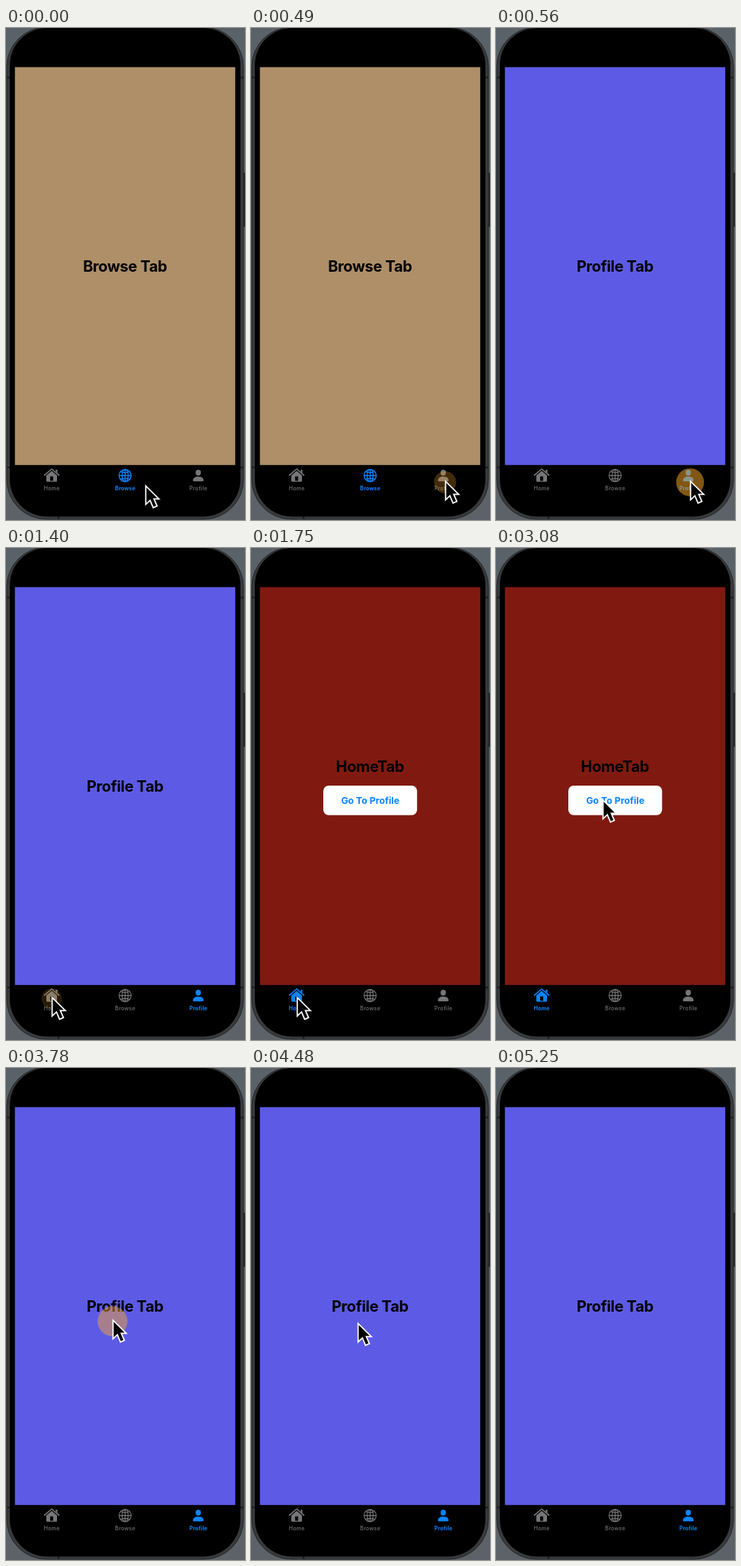
Recreate the animation shown at these times as an HTML page. Size 314 by 646 pixels, loop 5.46 s.

```html
<!DOCTYPE html>
<html lang="en">
<head>
<meta charset="utf-8">
<title>Tab bar</title>
<style>
  html, body { margin: 0; width: 100%; height: 100%; overflow: hidden; background: #000; }
  svg { display: block; width: 100%; height: 100%; }
  text { font-family: Inter, sans-serif; text-anchor: middle; }
  .title { font-size: 20px; font-weight: 700; letter-spacing: -.35px; }
  .button { font-size: 12.3px; font-weight: 700; fill: #0a84ff; }
  .tab { color: #767678; fill: currentColor; }
  .tab.on { color: #0a84ff; }
  .tab text { font-size: 7px; font-weight: 500; letter-spacing: .3px; }
  .tab.on text { font-weight: 700; letter-spacing: .2px; }
  .line { fill: none; stroke: currentColor; stroke-width: 1.1; }
  .on .line { stroke-width: 1.35; }
</style>
</head>
<body>
<svg viewBox="0 0 314 646">
  <defs>
    <linearGradient id="wall" x2="0" y2="1">
      <stop stop-color="#5a6269"/>
      <stop offset="1" stop-color="#5c6268"/>
    </linearGradient>
  </defs>
  <rect width="314" height="646" fill="url(#wall)"/>
  <path d="M312 190h2v71h-2z" fill="#242526"/>
  <rect x="1" y="-1" width="311" height="646" rx="52" fill="#383a3b" stroke="#252627"/>
  <path d="M1 65h4M1 577h4M308 65h4M308 577h4M69 641v4M246 0v1" stroke="#1f2021" stroke-width="2.500"/>
  <rect x="5" y="0" width="303" height="641.5" rx="49"/>
  <rect id="screen" x="11.7" y="51.4" width="289.5" height="522.4"/>

  <text id="title" class="title" x="156.300"></text>
  <g id="button">
    <rect x="95" y="312" width="123.200" height="38.700" rx="7" fill="#fff"/>
    <text class="button" x="156.700" y="336">Go To Profile</text>
  </g>

  <g class="tab">
    <path d="M50.600 587.200 60 579l9.400 8.200" fill="none" stroke="currentColor" stroke-width="1.600" stroke-linecap="round" stroke-linejoin="round"/>
    <path fill-rule="evenodd" d="M65.300 580h2.200v4.800l-2.200-2zM60 581.600l7 6v6.800q0 1.400-1.400 1.400h-11.200q-1.400 0-1.400-1.400v-6.800zM58 588.800v5.600h4v-5.600z"/>
    <text x="60.200" y="607">Home</text>
  </g>
  <g class="tab">
    <g class="line">
      <circle cx="156.500" cy="587.600" r="8"/>
      <ellipse cx="156.500" cy="587.600" rx="4" ry="8"/>
      <path d="M148.500 587.600h16M156.500 579.600v16M150.600 582.500q5.900 2.600 11.800 0M150.600 592.700q5.900-2.600 11.800 0"/>
    </g>
    <text x="156.700" y="607">Browse</text>
  </g>
  <g class="tab">
    <ellipse cx="252.600" cy="583.800" rx="3.500" ry="3.900"/>
    <path d="M245.600 594c0-3 2.800-5 7-5s7 2 7 5q0 1.300-1.400 1.300h-11.200q-1.400 0-1.400-1.300z"/>
    <text x="252.800" y="607">Profile</text>
  </g>

  <circle id="ripple" fill="#faa528"/>
  <path id="cursor" d="M.6 1.200V25.500L6.300 20.200 10.400 29.800 15.500 27.600 11.400 18.400H18Z" stroke="#fff" stroke-width="1.700"/>
</svg>
<script>
const LOOP = 5460, STEP = 70, RIPPLE = 390;
const $ = id => document.getElementById(id);
const tabs = document.querySelectorAll('.tab');

const HOME = { tab: 0, color: '#801a10', title: 'HomeTab', y: 294.4 };
const BROWSE = { tab: 1, color: '#ae8f68', title: 'Browse Tab', y: 320 };
const PROFILE = { tab: 2, color: '#5d5be6', title: 'Profile Tab', y: 320 };

const start = [183, 600], onProfile = [255, 594], onHome = [60, 589], onButton = [140, 330];

const easeInOut = p => p < .5 ? 4 * p ** 3 : 1 - 4 * (1 - p) ** 3;
const easeIn = p => p * p;
const linear = p => p;

const moves = [
  { from: 40, to: 390, path: [start, start, onProfile, onProfile], ease: easeInOut },
  { from: 680, to: 1260, path: [onProfile, onProfile, onHome, onHome], ease: linear },
  { from: 1720, to: 2480, path: [onHome, [230, 560], [290, 340], onButton], ease: easeInOut },
  { from: 4450, to: 4690, path: [onButton, [142, 420], [146, 540], [148, 650]], ease: easeIn }
];

const clicks = [
  { at: 410, pos: onProfile, show: 510, view: PROFILE },
  { at: 1340, pos: onHome, show: 1450, view: HOME },
  { at: 3600, pos: onButton, show: 3700, view: PROFILE }
];

function set(el, attrs) {
  for (const key in attrs) el.setAttribute(key, attrs[key]);
}

function bezier([a, b, c, d], p) {
  const q = 1 - p;
  return [0, 1].map(i => q ** 3 * a[i] + 3 * q * q * p * b[i] + 3 * q * p * p * c[i] + p ** 3 * d[i]);
}

function cursorAt(t) {
  const move = moves.filter(m => t >= m.from).pop();
  if (!move) return start;
  const p = Math.min(1, (t - move.from) / (move.to - move.from));
  return bezier(move.path, move.ease(p));
}

function drawRipple(t) {
  const click = clicks.find(c => t >= c.at && t < c.at + RIPPLE);
  $('ripple').style.display = click ? '' : 'none';
  if (!click) return;
  const age = t - click.at, left = 1 - age / RIPPLE;
  set($('ripple'), {
    cx: click.pos[0],
    cy: click.pos[1] + 2.5,
    r: 9 + 15 * (1 - left * left),
    opacity: .52 * Math.min(1, (age / 120) ** 1.7, left / .6)
  });
}

function drawView(t) {
  const click = clicks.filter(c => t >= c.show).pop();
  const view = click ? click.view : BROWSE;
  set($('screen'), { fill: view.color });
  set($('title'), { y: view.y });
  $('title').textContent = view.title;
  $('button').style.display = view === HOME ? '' : 'none';
  tabs.forEach((tab, i) => tab.classList.toggle('on', i === view.tab));
}

function draw(now) {
  const t = Math.floor(now % LOOP / STEP) * STEP;
  drawView(t);
  drawRipple(t);
  set($('cursor'), { transform: `translate(${cursorAt(t)})` });
}

function tick() {
  draw(performance.now());
  requestAnimationFrame(tick);
}
tick();
</script>
</body>
</html>
```
